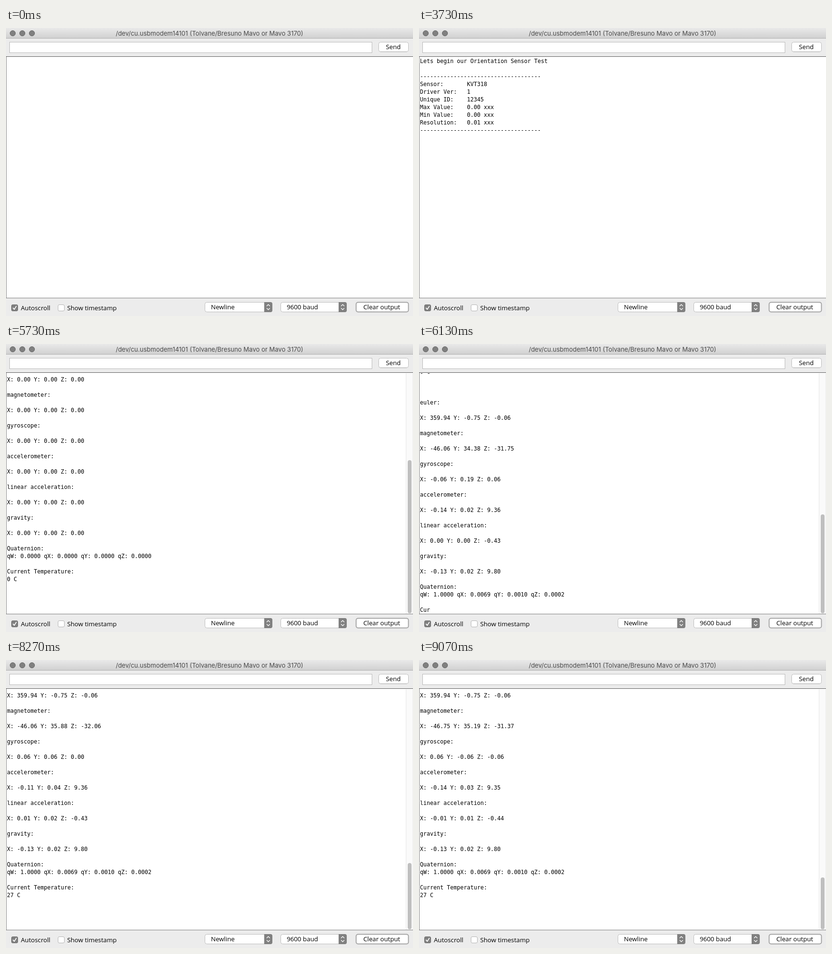
Recreate the animation shown at these times as an HTML page. Size 848x600 px, loop 9140 ms.

```html
<!DOCTYPE html>
<html lang="en">
<head>
<meta charset="utf-8">
<title>Serial monitor</title>
<style>
  html, body { margin: 0; width: 100%; height: 100%; overflow: hidden; background: #ececec; }
  #stage { position: relative; width: 848px; height: 600px; overflow: hidden; }
  svg { position: absolute; left: 0; top: 0; }
  svg text { font: 500 13.2px "Open Sans", "Noto Sans", sans-serif; fill: #000; }
  svg .title { font: 400 13px Inter, Roboto, sans-serif; fill: #4a4a4a; text-anchor: middle; }
  #view { position: absolute; left: 1px; top: 61px; width: 847px; height: 501px; overflow: hidden; background: #fff; }
  #log { position: absolute; left: 1px; top: 0; margin: 0; color: #000;
         font: 11.63px/16px "DejaVu Sans Mono", "Noto Sans Mono", monospace; }
  #track { position: absolute; right: 0; top: 0; width: 15px; height: 501px; box-sizing: border-box;
           background: #fafafa; border-left: 1px solid #e6e6e6; border-right: 1px solid #ededed; }
  #thumb { position: absolute; left: 3px; width: 8px; border-radius: 4px; background: #bfbfbf; }
</style>
</head>
<body>
<div id="stage">
  <svg width="848" height="600" viewBox="0 0 848 600">
    <defs>
      <linearGradient id="bar" x2="0" y2="1">
        <stop stop-color="#e9e9e9"/><stop offset="1" stop-color="#d1d1d1"/>
      </linearGradient>
      <g id="arrows" fill="none" stroke="#fff" stroke-width="1.3" stroke-linecap="round" stroke-linejoin="round">
        <path d="M-3 -2.5L0 -5.5L3 -2.5M-3 2.5L0 5.5L3 2.5"/>
      </g>
    </defs>
    <rect width="848" height="600" fill="#ececec"/>
    <rect width="848" height="21" fill="url(#bar)"/>
    <rect y="21" width="848" height="1" fill="#b0b0b0"/>
    <g fill="#808080" stroke="#686868">
      <circle cx="14" cy="11" r="5.6"/><circle cx="34" cy="11" r="5.6"/><circle cx="54" cy="11" r="5.6"/>
    </g>
    <text class="title" x="424" y="16">/dev/cu.usbmodem14101 (Tolvane/Bresuno Mavo or Mavo 3170)</text>

    <rect x="7.5" y="29.5" width="755" height="22" fill="#fff" stroke="#b9b9b9"/>
    <rect x="776.5" y="29.5" width="62" height="20" rx="4" fill="#fff" stroke="#bcbcbc"/>
    <path d="M780 49.5H835" stroke="#a8a8a8"/>
    <text x="791.5" y="44">Send</text>

    <rect y="59" width="848" height="504" fill="#fff"/>
    <path d="M0 59.5H848" stroke="#5c5c5c"/>
    <path d="M0.5 60V562" stroke="#808080"/>
    <path d="M0 562.5H848" stroke="#808080"/>

    <rect x="11.5" y="576.5" width="13" height="13" rx="2.5" fill="#808080" stroke="#6e6e6e"/>
    <path d="M14.8 583.4L17.2 586.2L21.4 579.6" fill="none" stroke="#fff" stroke-width="1.7" stroke-linecap="round" stroke-linejoin="round"/>
    <text x="31" y="588">Autoscroll</text>
    <rect x="108.5" y="576.5" width="13" height="13" rx="2.5" fill="#fff" stroke="#b4b4b4"/>
    <text x="127.5" y="588">Show timestamp</text>

    <rect x="414.5" y="571.5" width="140" height="20" rx="4" fill="#fff" stroke="#bcbcbc"/>
    <path d="M538 571H551a4 4 0 0 1 4 4V588a4 4 0 0 1 -4 4H538Z" fill="#808080"/>
    <use href="#arrows" x="546.5" y="581.5"/>
    <text x="427" y="586">Newline</text>

    <rect x="572.5" y="571.5" width="137" height="20" rx="4" fill="#fff" stroke="#bcbcbc"/>
    <path d="M693 571H706a4 4 0 0 1 4 4V588a4 4 0 0 1 -4 4H693Z" fill="#808080"/>
    <use href="#arrows" x="701.5" y="581.5"/>
    <text x="585" y="586">9600 baud</text>

    <rect x="729.5" y="571.5" width="109" height="20" rx="4" fill="#fff" stroke="#a6a6a6" stroke-width="2"/>
    <text x="744.5" y="586">Clear output</text>
  </svg>
  <div id="view">
    <pre id="log"></pre>
    <div id="track"><div id="thumb"></div></div>
  </div>
</div>
<script>
const LOOP = 9140, TICK = 200 / 3, BYTES_PER_MS = 0.96;
const LINE = 16, VIEW = 501, RAIL = 499;
const EOL = "\r\n";
const rule = "-".repeat(36);
const lines = (...rows) => rows.join(EOL) + EOL;

const axes = ([x, y, z]) => `X: ${x} Y: ${y} Z: ${z}`;
const names = ["euler", "magnetometer", "gyroscope", "accelerometer", "linear acceleration", "gravity"];

// One sensor report; each reading is "x y z".
function report(readings, quat, temp) {
  const rows = [];
  readings.forEach((r, i) => rows.push(names[i] + ":", "", axes(r.split(" ")), ""));
  const q = quat.split(" ");
  rows.push("Quaternion:", ["W", "X", "Y", "Z"].map((k, i) => `q${k}: ${q[i]}`).join(" "));
  rows.push("", "Current Temperature:", temp + " C", "", "", "");
  return lines(...rows);
}

const euler = "359.94 -0.75 -0.06", gravity = "-0.13 0.02 9.80";
const live = (...mid) => report([euler, ...mid, gravity], "1.0000 0.0069 0.0010 0.0002", 27);

// Serial output: start time in ms, text sent from then on.
const output = [
  [1445, lines("Lets begin our Orientation Sensor Test", "")],
  [2905, lines(rule, "Sensor:       KVT318", "Driver Ver:   1", "Unique ID:    12345",
    "Max Value:    0.00 xxx", "Min Value:    0.00 xxx", "Resolution:   0.01 xxx", rule, "")],
  [3870, lines("", "System Status: 0x5", "Self Test:     0xF", "System Error:  0x0", "")],
  [4397.4, report(Array(6).fill("0.00 0.00 0.00"), "0.0000 0.0000 0.0000 0.0000", 0)],
  [5785.9, live("-46.06 34.38 -31.75", "-0.06 0.19 0.06", "-0.14 0.02 9.36", "0.00 0.00 -0.43")],
  [7136, live("-46.06 35.88 -32.06", "0.06 0.06 0.00", "-0.11 0.04 9.36", "0.01 0.02 -0.43")],
  [8490, live("-46.75 35.19 -31.37", "0.06 -0.06 -0.06", "-0.14 0.03 9.35", "-0.01 0.01 -0.44")]
];
const THUMB_FREE = 4630; // the thumb rests at the top until then

const [log, track, thumb] = ["log", "track", "thumb"].map(id => document.getElementById(id));
let shown = -1;

function draw(time) {
  const tick = Math.floor((time % LOOP + 4) / TICK);
  if (tick === shown) return;
  shown = tick;
  const t = tick * TICK;
  const text = output
    .map(([start, s]) => s.slice(0, Math.max(0, Math.floor((t - start) * BYTES_PER_MS))))
    .join("").replace(/\r/g, "");
  const height = text.split("\n").length * LINE;
  const scroll = Math.max(0, height - VIEW);
  log.textContent = text;
  log.style.top = -scroll + "px";
  track.style.display = scroll ? "block" : "none";
  const size = RAIL * VIEW / height;
  thumb.style.height = size + "px";
  thumb.style.top = 1 + (t < THUMB_FREE ? 0 : RAIL - size) + "px";
}

const begin = performance.now();
function loop() {
  draw(performance.now() - begin);
  requestAnimationFrame(loop);
}
loop();
</script>
</body>
</html>
```
